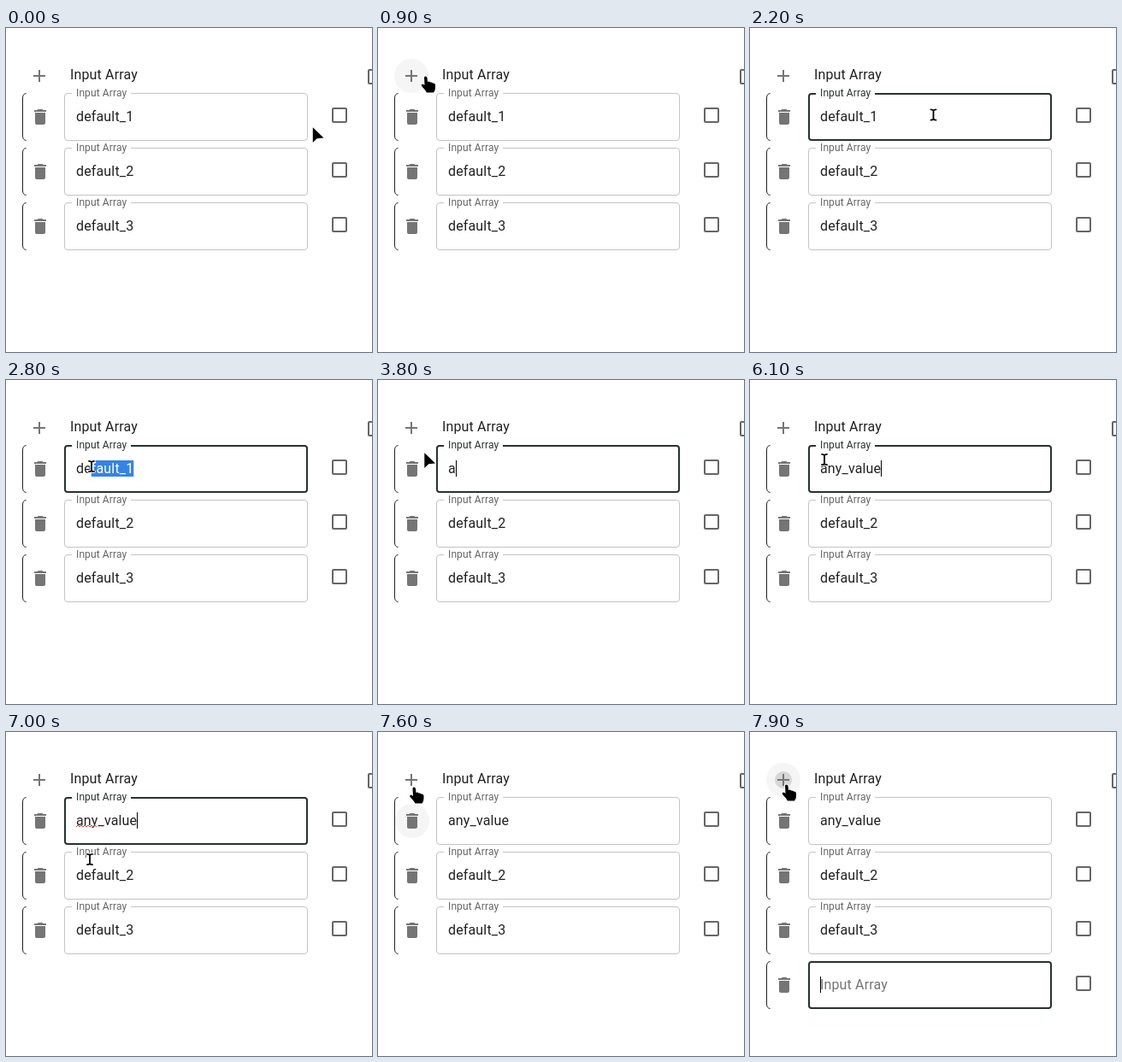
These frames come from a looping animation (428x379 px, 8 s). An HTML page:

```html
<!DOCTYPE html>
<html lang="en">
<head>
<meta charset="utf-8">
<title>Input array</title>
<style>
  html, body { margin: 0; width: 100%; height: 100%; overflow: hidden; background: #fff; }
  svg { display: block; }
  text { font: 16px Roboto, Arial, sans-serif; letter-spacing: .00938em; fill: #212121; white-space: pre; }
  .label { font-size: 12px; fill: #666; }
  .empty { font-size: 16px; fill: #757575; }
  .focus .label { fill: #263330; }
  .focus .empty { fill: #757575; }
  .outline { fill: none; stroke: #c4c4c4; }
  .hover .outline { stroke: #212121; }
  .focus .outline { stroke: #263330; stroke-width: 2; }
  .icon { fill: #757575; }
  .box { fill: #666; }
  .halo { fill: #f5f5f5; }
  .cursor path { stroke-linejoin: round; stroke-linecap: round; }
</style>
</head>
<body>
<svg id="stage" width="428" height="379" viewBox="0 0 428 379"></svg>
<script>
const LOOP = 8000, STEP = 100;
const PLUS = [39, 56], TRASH = [40, 104], HALO = 20;
const LEFT = 68, RIGHT = 353, TOP = 76, BOTTOM = 132, PITCH = 64, TEXT_X = 82;
const BOX_ICON = 'M19 5v14H5V5h14m0-2H5c-1.1 0-2 .9-2 2v14c0 1.1.9 2 2 2h14c1.1 0 2-.9 2-2V5c0-1.1-.9-2-2-2z';
const TRASH_ICON = 'M6 19c0 1.1.9 2 2 2h8c1.1 0 2-.9 2-2V7H6v12zM19 4h-3.5l-1-1h-5l-1 1H5v2h14V4z';
const PLUS_ICON = 'M19 13h-6v6h-2v-6H5v-2h6V5h2v6h6v2z';
const CURSORS = {
  arrow: 'M.3 .3V18L5.2 13.3 13 12.4Z',
  hand: 'M-1.5 2Q-1.5 .5 0 .5T2 2L2.5 7Q4.5 6 5.5 7.5Q7.5 7 8.5 8.5Q11 8 11.5 10.5V14Q11.5 17 9.5 19.5H1.5Q-.5 16-4.5 12Q-5.5 10-3.7 9.5Q-2 9.8-1 11Z',
  beam: 'M-3-6.2Q-.8-6.2 0-5Q.8-6.2 3-6.2M0-5V5M-3 6.2Q-.8 6.2 0 5Q.8 6.2 3 6.2'
};

// time, x, y of the pointer's hot spot
const POINTER = [
  [0, 358.5, 116], [200, 358.5, 116], [300, 345, 113], [500, 235, 95], [700, 95, 60],
  [800, 54, 48], [900, 55.5, 56], [1100, 209.5, 93], [1300, 214.5, 101.5], [2200, 214.5, 101.5],
  [2300, 220, 101], [2400, 217, 102], [2800, 100, 101], [3000, 57, 101], [3100, 54, 85],
  [6000, 54, 85], [6100, 87, 93], [6200, 90, 110], [6300, 93, 150], [6400, 95, 164],
  [6600, 97, 128], [6700, 97, 128], [6900, 98, 136], [7000, 98, 149], [7200, 68, 284],
  [7300, 30, 262], [7400, 20.5, 170], [7600, 42, 64], [7700, 42.5, 61], [8000, 42.5, 61]
];
// moment each typed letter appears
const KEYS = [3800, 3900, 4100, 4700, 5000, 5100, 5200, 5500, 5600];
const TYPED = 'any_value';
const FOCUS = 1600, DRAG = 2300, DROP = 3100, SPELL = 6800, BLUR = 7600, PRESS = 7600, ADD = 7800, FOCUS_NEW = 7900;

const stage = document.getElementById('stage');

function add(parent, tag, attrs = {}, content = '') {
  const el = document.createElementNS('http://www.w3.org/2000/svg', tag);
  set(el, attrs);
  el.textContent = content;
  return parent.appendChild(el);
}
function set(el, attrs) {
  for (const key in attrs) el.setAttribute(key, attrs[key]);
}
function show(el, on) {
  el.style.display = on ? '' : 'none';
}
function icon(parent, d, x, y, cls) {
  return add(parent, 'path', { d, class: cls, transform: `translate(${x} ${y})` });
}
function halo(parent, [cx, cy]) {
  return add(parent, 'circle', { cx, cy, r: HALO, class: 'halo' });
}

function outline(width, notched) {
  const i = width / 2, r = 4 - i;
  const l = LEFT + i, t = TOP + i, w = RIGHT - LEFT - width, h = BOTTOM - TOP - width;
  const a = `a${r} ${r} 0 0 1 `;
  return `M${notched ? 146 : 77} ${t}H${l + w - r}${a}${r} ${r}v${h - 2 * r}${a}${-r} ${r}` +
    `H${l + r}${a}${-r} ${-r}v${2 * r - h}${a}${r} ${-r}H77`;
}

function makeRow(index, value) {
  const g = add(stage, 'g', { transform: `translate(0 ${index * PITCH})` });
  const notched = value !== '';
  const row = { g, index, notched };
  row.halo = halo(g, TRASH);
  add(g, 'path', { d: 'M23.5 76.5Q19.5 77 19.5 82V126Q19.5 131 23.5 131.5', fill: 'none', stroke: '#212121' });
  icon(g, TRASH_ICON, 28, 92, 'icon');
  icon(g, BOX_ICON, 378, 90, 'box');
  row.outline = add(g, 'path', { class: 'outline' });
  add(g, 'text', { x: TEXT_X, y: notched ? 80 : 109, class: notched ? 'label' : 'label empty' }, 'Input Array');
  row.text = add(g, 'text', { x: TEXT_X, y: 109 }, value);
  row.caret = add(g, 'rect', { x: TEXT_X, y: 94, width: 1, height: 19, fill: '#000' });
  return row;
}

const plusHalo = halo(stage, PLUS);
const ripple = add(stage, 'circle', { cx: PLUS[0], cy: PLUS[1], fill: '#d6d6d6' });
icon(stage, PLUS_ICON, 27, 44, 'icon');
add(stage, 'text', { x: 75, y: 60 }, 'Input Array');
icon(stage, BOX_ICON, 420, 45, 'box');

const rows = ['default_1', 'default_2', 'default_3', ''].map((value, i) => makeRow(i, value));
const first = rows[0], last = rows[3];

let wave = 'M82 111';
for (let i = 0; i < 6; i++) wave += 'l2-2l2 2';
const squiggle = add(stage, 'path', { d: wave, fill: 'none', stroke: '#e53935' });

const clip = add(add(stage, 'clipPath', { id: 'picked' }), 'rect', { y: 94, height: 19 });
const picked = add(stage, 'g', { 'clip-path': 'url(#picked)' });
add(picked, 'rect', { x: TEXT_X, y: 94, width: 90, height: 19, fill: '#3584e4' });
add(picked, 'text', { x: TEXT_X, y: 109, style: 'fill:#fff' }, 'default_1');

const cursor = add(stage, 'g', { class: 'cursor' });
const cursors = {};
for (const kind in CURSORS) {
  const g = cursors[kind] = add(cursor, 'g');
  const beam = kind === 'beam', d = CURSORS[kind];
  add(g, 'path', { d, fill: beam ? 'none' : '#fff', stroke: '#fff', 'stroke-width': beam ? 3.6 : 2 });
  add(g, 'path', { d, fill: beam ? 'none' : '#000', stroke: beam ? '#000' : 'none', 'stroke-width': 1.8 });
}

function pointerAt(t) {
  const i = Math.max(1, POINTER.findIndex(p => p[0] >= t));
  const [t0, x0, y0] = POINTER[i - 1], [t1, x1, y1] = POINTER[i];
  const k = (t - t0) / (t1 - t0);
  return [x0 + (x1 - x0) * k, y0 + (y1 - y0) * k];
}
const near = ([x, y], [cx, cy]) => Math.hypot(x - cx, y - cy) < HALO;
const overTrash = (p, i) => near(p, [TRASH[0], TRASH[1] + i * PITCH]);
const overField = ([x, y], i) =>
  x >= LEFT && x < RIGHT && y >= TOP + i * PITCH && y < BOTTOM + i * PITCH;

function cursorKind(p, t) {
  const live = [0, 1, 2];
  if (t >= DRAG && t < DROP || live.some(i => overField(p, i))) return 'beam';
  return near(p, PLUS) || live.some(i => overTrash(p, i)) ? 'hand' : 'arrow';
}

function drawSelection(t) {
  const on = t >= DRAG && t < KEYS[0];
  const end = first.text.getComputedTextLength();
  const x = pointerAt(Math.min(t, DROP))[0] - TEXT_X;
  const kept = Math.round(Math.max(0, Math.min(1, x / end)) * 9);
  show(picked, on && kept < 9);
  if (!on) return;
  const from = kept ? first.text.getSubStringLength(0, kept) : 0;
  set(clip, { x: TEXT_X + from, width: Math.max(0, end - from) });
}

function drawRow(row, t, hot) {
  const { index: i } = row;
  const focus = row === first ? t >= FOCUS && t < BLUR : row === last && t >= FOCUS_NEW;
  row.g.setAttribute('class', focus ? 'focus' : overField(hot, i) ? 'hover' : '');
  row.outline.setAttribute('d', outline(focus ? 2 : 1, row.notched));
  show(row.halo, overTrash(hot, i));
  show(row.caret, focus && (row === last || t >= KEYS[0]));
}

function draw(now) {
  const t = Math.floor(now % LOOP / STEP) * STEP;
  const at = pointerAt(t);
  const hot = pointerAt(Math.max(0, t - STEP)); // the page reacts one step late

  const count = KEYS.filter(k => k <= t).length;
  const value = count ? TYPED.slice(0, count) : 'default_1';
  if (first.text.textContent !== value) first.text.textContent = value;
  for (const row of rows) drawRow(row, t, hot);
  set(first.caret, { x: Math.round(TEXT_X + first.text.getComputedTextLength()) });
  drawSelection(t);

  show(last.g, t >= ADD);
  show(squiggle, t >= SPELL && t < BLUR);
  show(plusHalo, near(hot, PLUS));
  show(ripple, t > PRESS);
  set(ripple, { r: Math.max(0, 4 + (t - PRESS) / 50) });

  const kind = cursorKind(at, t);
  for (const k in cursors) show(cursors[k], k === kind);
  set(cursor, { transform: `translate(${at})` });
}

const start = performance.now();
function tick() {
  draw(performance.now() - start);
  requestAnimationFrame(tick);
}
tick();
</script>
</body>
</html>
```
